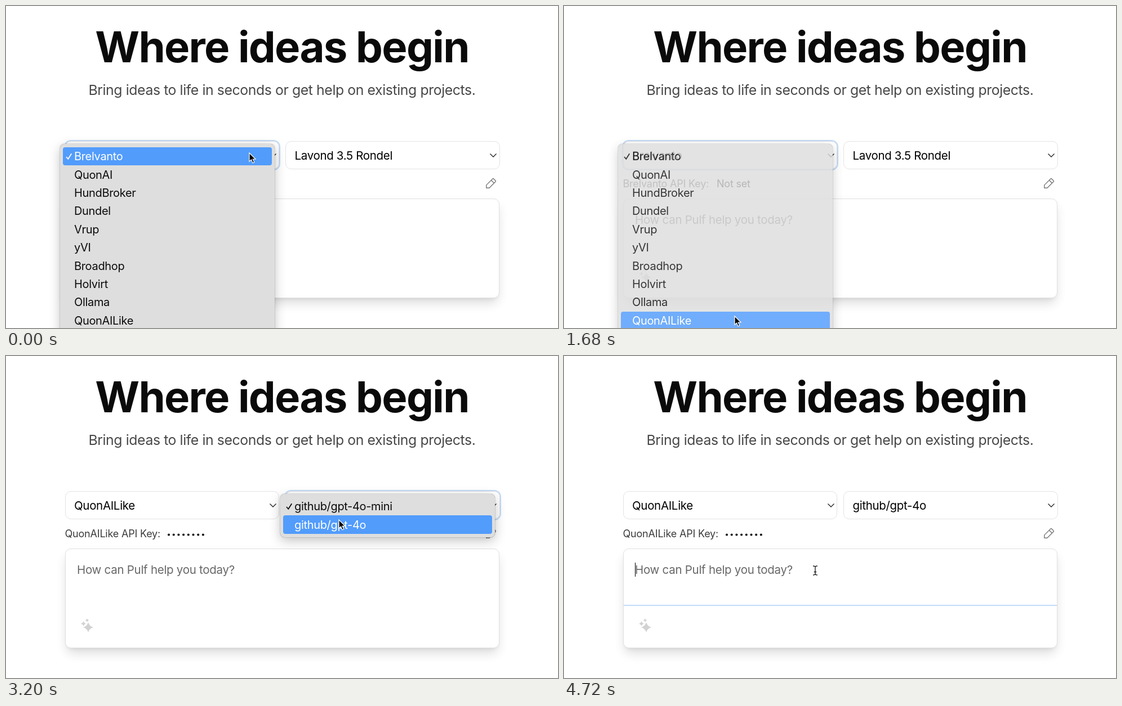
Recreate the animation shown at these times as an HTML page. Size 980 px wide and 572 px high, loop 4.88 s.

```html
<!DOCTYPE html>
<html lang="en">
<head>
<meta charset="utf-8">
<title>Model picker</title>
<style>
html, body { margin: 0; width: 100%; height: 100%; overflow: hidden; background: #fff; }
#stage {
  position: relative; width: 980px; height: 572px; overflow: hidden; background: #fff;
  font-family: Inter, "Liberation Sans", sans-serif; font-optical-sizing: none; color: #0a0a0a;
}
#stage div, #stage svg { position: absolute; box-sizing: border-box; }
.text { white-space: pre; height: 40px; line-height: 40px; margin-top: -20px; }
.center { left: 0; width: 980px; text-align: center; }
h1.text { position: absolute; margin-bottom: 0; top: 71.5px; font-size: 76px; font-weight: 700; letter-spacing: -1.68px; }
.sub { top: 148.5px; font-size: 24.8px; letter-spacing: -.41px; color: #484848; }
.select { top: 240px; width: 380.5px; height: 50px; border: 1px solid #e3e3e3; border-radius: 10px; background: #fff; }
.select .text { left: 15.5px; top: 24.7px; font-size: 20.5px; letter-spacing: -.33px; color: #000; }
.select svg { left: 361px; top: 18.5px; }
.key { top: 316px; font-size: 18px; letter-spacing: -.2px; color: #3c3c3c; }
#prompt {
  left: 104.5px; top: 342px; width: 771.5px; height: 176.5px; border: 1px solid #e0e0e0;
  border-radius: 10px; background: #fff;
  box-shadow: 0 13px 20px -4px rgba(0,0,0,.1), 0 5px 8px -5px rgba(0,0,0,.1), 0 8px 22px rgba(0,0,0,.04);
}
#hint { left: 126px; top: 380px; font-size: 20.5px; letter-spacing: -.28px; color: #686868; }
#line { left: 105.5px; top: 441.5px; width: 769.5px; height: 2.5px; background: #c3dbf7; }
#caret { left: 126px; top: 367px; width: 1.3px; height: 25px; background: #000; }
.menu {
  top: 245px; width: 381px; border-radius: 8px; background: #dedede;
  box-shadow: 0 0 1.5px rgba(0,0,0,.5), 0 6px 20px rgba(0,0,0,.24);
}
.row { left: 5.5px; width: 370.5px; height: 32.4px; border-radius: 4px; color: #0c0c0c; }
.row .text { left: 20px; top: 16.3px; font-size: 20px; letter-spacing: -.33px; }
.row svg { left: 5px; top: 10px; }
.row.on { background: #529cfc; color: #fff; }
#ring { width: 45px; height: 45px; margin: -22.5px; border: 1.6px solid #111; border-radius: 50%; }
svg { overflow: visible; fill: none; }
</style>
</head>
<body>
<div id="stage">
  <h1 class="text center">Where ideas begin</h1>
  <div class="text center sub">Bring ideas to life in seconds or get help on existing projects.</div>

  <div class="select" id="maker" style="left:104.5px"><div class="text"></div></div>
  <div class="select" id="model" style="left:496px"><div class="text"></div></div>

  <div class="text key" id="keyName" style="left:104.5px"></div>
  <div class="text key" id="unset" style="left:271px;color:#000">Not set</div>
  <svg id="dots" width="980" height="572" stroke="#111" stroke-width="4.2" stroke-linecap="round" stroke-dasharray="0 8.7">
    <path d="M289 317.5H351"/>
  </svg>
  <svg style="left:860px;top:315.5px" width="1" height="1" stroke="#777" stroke-width="1.4" stroke-linejoin="round">
    <g transform="rotate(45)"><path d="M-3.6 -9.2q0-1.3 1.3-1.3h4.6q1.3 0 1.3 1.3V6.6L0 10.2L-3.6 6.6ZM-3.6 -5.6H3.6"/></g>
  </svg>

  <div id="prompt"></div>
  <div class="text" id="hint">How can Pulf help you today?</div>
  <svg id="sparkle" width="980" height="572" style="fill:#d2d2d2"></svg>
  <div id="line"></div>
  <div id="caret"></div>

  <div class="menu" id="makers" style="left:95.5px;height:420px"></div>
  <div class="menu" id="models" style="left:486.5px;height:77px"></div>

  <div id="ring"></div>
  <svg id="arrow" width="1" height="1">
    <path d="M0 0V15.2L3.5 12L6 17.7L8.7 16.6L6.2 11H11Z" fill="#000" stroke="#fff" stroke-width="1.2"/>
  </svg>
  <svg id="beam" width="1" height="1" stroke="#222" stroke-width="1.4">
    <path d="M-4 -8Q0 -8 0 -6Q0 -8 4 -8M0 -6V6M-4 8Q0 8 0 6Q0 8 4 8M-2.2 2.5H2.2"/>
  </svg>
</div>
<script>
const LOOP = 4880, STEP = 80, ROW_TOP = 251, ROW_H = 32.4;
const $ = id => document.getElementById(id);
const show = (id, on) => { $(id).style.opacity = Number(on); };
const clamp = v => Math.max(0, Math.min(1, v));

const makers = ["Brelvanto", "QuonAI", "HundBroker", "Dundel", "Vrup", "yVI",
  "Broadhop", "Holvirt", "Ollama", "QuonAILike"];
const models = ["github/gpt-4o-mini", "github/gpt-4o"];

// time, x, y of the pointer tip
const path = [
  [80, 432, 261], [560, 312, 517], [720, 312, 517], [1120, 309, 520], [1280, 303, 551],
  [1880, 303, 551], [2240, 590, 267.5], [2720, 590, 267.5], [3000, 590.5, 290.5],
  [4120, 590.5, 290.5], [4480, 446, 381]
];
const clicks = [1360, 2240, 3600, 4480];

const tick = '<svg width="12" height="12" stroke="currentColor" stroke-width="1.8"><path d="M1 7L4.3 10.8L10.3 1.2"/></svg>';
const chevron = '<svg width="12" height="12" stroke="#222" stroke-width="1.3"><path d="M1.5 2.5L7 8L12.5 2.5"/></svg>';

function fillMenu(id, names) {
  $(id).innerHTML = names.map((name, i) =>
    `<div class="row" style="top:${ROW_TOP - 245 + i * ROW_H}px">${i ? "" : tick}<div class="text">${name}</div></div>`
  ).join("");
}

function star(x, y, r) {
  const k = r * 0.22;
  return `<path d="M${x} ${y - r}Q${x + k} ${y - k} ${x + r} ${y}Q${x + k} ${y + k} ${x} ${y + r}` +
    `Q${x - k} ${y + k} ${x - r} ${y}Q${x - k} ${y - k} ${x} ${y - r}Z"/>`;
}

function pointer(t) {
  const n = path.findIndex(p => p[0] > t);
  if (n === 0) return path[0].slice(1);
  if (n < 0) return path[path.length - 1].slice(1);
  const [a, b] = [path[n - 1], path[n]];
  const u = (t - a[0]) / (b[0] - a[0]), e = u * u * (3 - 2 * u);
  return [1, 2].map(i => a[i] + (b[i] - a[i]) * e);
}

function drawMenu(id, t, y, open, flash, fade) {
  const alpha = t < open ? 0 : clamp(1 - (t - fade) / 227);
  const menu = $(id);
  menu.style.opacity = alpha;
  menu.style.filter = alpha < 0.5 ? "grayscale(1)" : "none";
  const current = t === flash ? -1 : Math.floor((y - ROW_TOP) / ROW_H);
  [...menu.children].forEach((row, i) => row.classList.toggle("on", i === current));
}

function focus(id, color, width = 2.5, gap = 0) {
  const s = $(id).style;
  s.outline = color ? `${width}px solid ${color}` : "none";
  s.outlineOffset = gap + "px";
}

function place(id, x, y) {
  $(id).style.left = x + "px";
  $(id).style.top = y + "px";
}

function draw(time) {
  const t = Math.min(4720, Math.floor((time % LOOP) / STEP) * STEP);
  const [x, y] = pointer(t);
  const picked = t >= 1920;
  const maker = picked ? makers[9] : makers[0];

  $("maker").firstChild.textContent = maker;
  $("model").firstChild.textContent = !picked ? "Lavond 3.5 Rondel" : models[t < 4080 ? 0 : 1];
  $("keyName").textContent = maker + " API Key:";
  show("unset", !picked);
  show("dots", picked);

  focus("maker", t < 2320 ? "#c3dbf7" : t === 2320 ? "#e4e4ea" : "");
  if (t === 2320) focus("model", "#666", 1.2, 1);
  else focus("model", t < 2320 || t >= 4720 ? "" : t === 4640 ? "rgba(195,219,247,.5)" : "#c3dbf7");

  drawMenu("makers", t, y, 0, 1520, 1640);
  drawMenu("models", t, y, 2320, 3680, 3824);

  const age = Math.min(...clicks.map(c => t >= c ? t - c : LOOP));
  show("ring", age < 160 ? 1 : age < 240 ? 0.5 : 0);
  place("ring", x + 1, y + 1.5);

  const typing = t > 4120 && y > 342;
  show("arrow", !typing);
  show("beam", typing);
  place("arrow", x, y);
  place("beam", x, y);

  show("caret", t >= 4640);
  show("line", clamp((t - 4560) / 160));
}

fillMenu("makers", makers);
fillMenu("models", models);
for (const id of ["maker", "model"]) $(id).insertAdjacentHTML("beforeend", chevron);
$("sparkle").innerHTML = star(146, 482, 9) + star(137.5, 475.5, 4.5) + star(144, 469.5, 3.2);

const start = performance.now();
function loop() {
  draw(performance.now() - start);
  requestAnimationFrame(loop);
}
loop();
</script>
</body>
</html>
```
